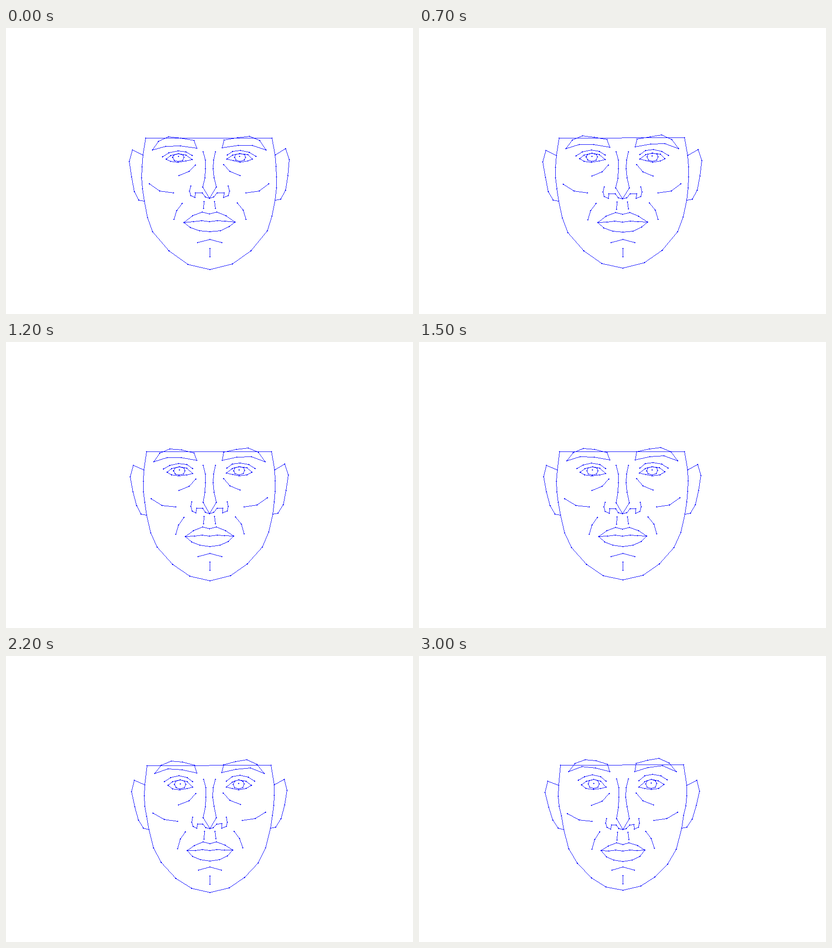
These frames come from a looping animation (893x627 px, 3.1 s). An HTML page with a canvas:

```html
<!DOCTYPE html>
<html lang="en">
<head>
<meta charset="utf-8">
<title>Face morph</title>
<style>
  html, body { margin: 0; width: 100%; height: 100%; overflow: hidden; background: #fff; }
  canvas { display: block; }
</style>
</head>
<body>
<canvas id="stage" width="893" height="627"></canvas>
<script>
const ctx = document.getElementById('stage').getContext('2d');
const LOOP = 3100, STEP = 100, LAST = 29;
const parts = [];

// Each part is a polyline of x,y pairs that slides from one pose to the other.
const part = (from, to, closed = false) => parts.push({ from, to, closed });

// Head outline
part(
  [306,241, 300,278, 298,304, 297,328, 299,352, 303,379, 310,415, 321,446, 357,488, 399,518, 447,528.9,
   496,517, 537,488, 573,444, 583,412, 590,377, 593,350, 593,326, 592,303, 590,278, 583,241],
  [310,239, 306,283, 305,307, 307,329, 312,350, 317,380, 328,422, 347,454, 378,486, 410,506, 447,513.2,
   486,504, 517,484, 545,456, 564,423, 576,377, 580,349, 585,328, 587,306, 587,283, 580,238], true);

// Ears
part([300,278, 277,267, 269.8,292, 275,326, 281,358, 291,377, 303,379],
     [306,283, 282,274, 276.3,299, 284,331, 293,359, 305,377, 317,380]);
part([590,278, 613,264, 621.3,288, 618,323, 613,355, 602,375, 590,377],
     [587,283, 609,272, 614.6,296, 608,327, 599,357, 587,375, 576,377]);

// Brows
part([321,267, 334,248, 356,238, 383,241, 412,246, 418,263, 382,258, 350,259],
     [328,253, 342,235, 364,227, 388,229, 413,237, 418,253, 387,245, 357,242], true);
part([570,267, 556,246, 534,237, 508,240, 478,245, 474,262, 509,257, 540,257],
     [564,253, 548,234, 526,223.7, 501,228, 476,235, 473,253, 502,244, 534,240], true);

// Eyelids
part([343,282, 357,273, 377,269, 394,271, 408,279],
     [349,272, 363,264, 380,260, 398,264, 410,274]);
part([485,278, 497,270, 514,268, 533,272, 548,281],
     [482,273, 495,262, 512,259, 530,262, 544,271]);

// Eyes
part([351,287, 361,279, 378,275, 394,278, 408,288, 394,291, 377,294, 361,292],
     [356,282, 367,274, 383,270, 398,274, 410,287, 398,290, 382,292, 366,290], true);
part([484,287, 497,278, 512,275, 530,277, 540,287, 530,291, 513,294, 498,290],
     [482,287, 495,275, 509,270, 524,273, 537,281, 525,290, 509,292, 495,290], true);

// Irises and pupils
part([365,283, 368,278, 378,275, 388,278, 390,283, 387,290, 377,292, 369,290],
     [371,280, 373,273, 383,270, 392,273, 395,280, 392,287, 383,290, 374,287], true);
part([501,283, 503,277, 513,275, 523,277, 525,283, 522,289, 513,292, 504,289],
     [497,280, 500,273, 509,270, 518,273, 521,279, 518,287, 509,290, 500,287], true);
part([378,281], [383,279]);
part([512,281], [509,278]);

// Lines under the eyes
part([379,323, 401,314, 415,300], [378,327, 401,318, 417,301]);
part([477,299, 491,314, 513,323], [476,300, 491,317, 514,326]);

// Cheekbones
part([314,341, 337,357, 367,361], [325,345, 351,359, 379,362]);
part([526,361, 555,357, 576,341], [515,360, 543,356, 567,342]);

// Cheek folds
part([386,384, 374,400, 368,419], [396,385, 385,402, 379,423]);
part([507,383, 520,399, 526,419], [497,384, 509,400, 516,421]);

// Nose ridge
part([432,271, 437,289, 437,308, 436,328, 431,348, 446,373, 461,348, 456,328, 454,308, 455,289, 459,271],
     [433,269, 438,288, 438,309, 437,331, 433,356, 447,380, 461,356, 456,330, 453,309, 454,288, 459,269]);

// Nostrils
part([405,346, 402,357, 405,367, 414,371, 415,361, 430,361, 437,370, 446,373,
      455,370, 463,361, 478,361, 477,371, 487,367, 490,357, 487,346],
     [411,356, 409,366, 412,375, 420,379, 422,370, 432,370, 438,378, 447,380,
      454,378, 462,370, 471,369, 472,379, 481,375, 483,366, 482,356]);

// Philtrum
part([434,380, 433,395], [435,386, 434,403]);
part([457,380, 459,395], [458,386, 460,402]);

// Mouth
part([390,426, 409,411, 430,403, 446,407, 462,403, 482,411, 502,425, 489,435, 470,444, 447,446, 424,444, 404,437],
     [399,426, 415,416, 433,409, 447,413, 460,409, 479,415, 495,425, 484,439, 467,447, 447,450, 427,447, 411,440], true);
part([390,426, 411,424, 429,422, 446,424, 463,422, 480,423, 502,425],
     [399,426, 416,427, 431,425, 447,427, 462,425, 478,426, 495,425]);

// Chin
part([420,470, 447,463, 473,470], [423,469, 447,462, 472,469]);
part([447,483, 447,501], [447,481, 447,499]);

// One-pixel line without smoothing
function line([x0, y0], [x1, y1]) {
  const n = Math.max(Math.abs(x1 - x0), Math.abs(y1 - y0));
  for (let i = 0; i <= n; i++) {
    const t = n ? i / n : 0;
    ctx.fillRect(Math.round(x0 + (x1 - x0) * t), Math.round(y0 + (y1 - y0) * t), 1, 1);
  }
}

function dot([x, y]) {
  ctx.fillRect(x - 1, y, 3, 1);
  ctx.fillRect(x, y - 1, 1, 3);
}

function pose({ from, to }, t) {
  const at = i => Math.round(from[i] + (to[i] - from[i]) * t);
  const points = [];
  for (let i = 0; i < from.length; i += 2) points.push([at(i), at(i + 1)]);
  return points;
}

function draw(step) {
  ctx.fillStyle = '#fff';
  ctx.fillRect(0, 0, 893, 627);
  ctx.fillStyle = '#00f';
  for (const p of parts) {
    const points = pose(p, step / LAST);
    for (let i = 1; i < points.length; i++) line(points[i - 1], points[i]);
    if (p.closed) line(points[points.length - 1], points[0]);
    points.forEach(dot);
  }
}

let shown = -1;
function tick() {
  const time = performance.now() % LOOP;
  // The first pose holds for two steps.
  const step = Math.max(0, Math.floor(time / STEP) - 1);
  if (step !== shown) draw(shown = step);
  requestAnimationFrame(tick);
}
tick();
</script>
</body>
</html>
```
